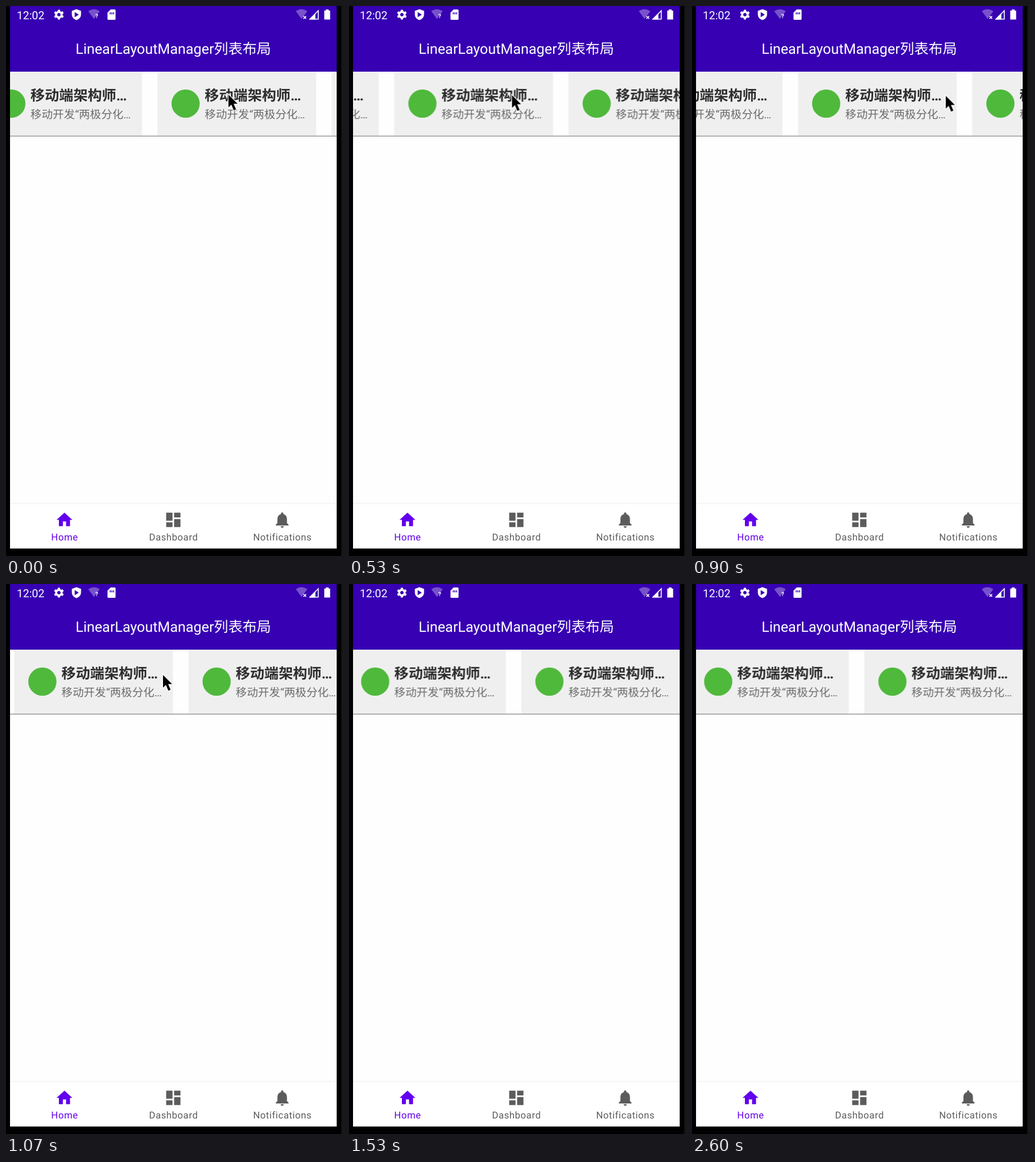
Recreate the animation shown at these times as an HTML page. Size 586 by 955 pixels, loop 2.63 s.

```html
<!DOCTYPE html>
<html lang="zh-CN">
<head>
<meta charset="utf-8">
<title>LinearLayoutManager</title>
<style>
  html, body { margin: 0; width: 100%; height: 100%; overflow: hidden; background: #000; }
  svg { display: block; }
  text { font-family: Roboto, "Noto Sans CJK SC", "Noto Sans CJK", sans-serif; text-rendering: geometricPrecision; }
  .heading { font-size: 24.85px; fill: #fff; text-anchor: middle; }
  .clock { font-size: 19.33px; fill: #fff; }
  .name { font-size: 24.85px; font-weight: 700; fill: #2d2d2d; }
  .note { font-size: 19.33px; fill: #6c6c6c; }
  .tab { font-size: 16.57px; letter-spacing: .55px; text-anchor: middle; }
  .nav { fill: #5c5c5c; }
  .nav .active { fill: #6200ee; }

  #list { animation: scroll 2630ms linear infinite; }
  #pointer { animation: point 2630ms linear infinite; }

  /* drag, fling, drag, fling, hard stop at the end of the list */
  @keyframes scroll {
    0% { transform: translateX(0); animation-timing-function: cubic-bezier(.36, .1, .67, .42); }
    12.5475% { transform: translateX(-225.5px); animation-timing-function: cubic-bezier(.33, .66, .67, .83); }
    27.7567% { transform: translateX(-608px); }
    33.27% { transform: translateX(-676.5px); animation-timing-function: cubic-bezier(.33, .1, .67, .36); }
    40.6844% { transform: translateX(-853.5px); animation-timing-function: cubic-bezier(.33, .57, .67, .75); }
    50.5703% { transform: translateX(-1123.5px); }
    53.42%, 100% { transform: translateX(-1176px); }
  }
  @keyframes point {
    0% { transform: translate(386px, 152px); animation-timing-function: cubic-bezier(.36, .1, .67, .42); }
    12.5475%, 14% { transform: translate(163px, 152px); animation-timing-function: ease-in-out; }
    27.7%, 33.27% { transform: translate(449px, 154px); animation-timing-function: cubic-bezier(.33, .1, .67, .36); }
    40.6844% { transform: translate(272px, 156px); opacity: 1; }
    57% { transform: translate(272px, 156px); opacity: 1; animation-timing-function: step-start; }
    57.01%, 100% { transform: translate(272px, 156px); opacity: 0; }
  }
</style>
</head>
<body>
<svg width="586" height="955" viewBox="0 0 586 955">
  <defs>
    <clipPath id="view"><rect x="7" y="114" width="568" height="112"/></clipPath>
    <g id="card">
      <rect y="114" width="276" height="111.5" fill="#efefef"/>
      <circle cx="49" cy="169.5" r="24.5" fill="#4fb93c"/>
      <text class="name" x="82.3" y="163.8">移动端架构师…</text>
      <text class="note" x="82.3" y="194.8">移动开发“两极分化…</text>
    </g>
    <path id="wifi" d="M-10 -13.5Q0 -20.5 10 -13.5L0 0z" opacity=".32"/>
    <path id="tooth" d="M-2.6 -5L-1.7 -8.6H1.7L2.6 -5z"/>
  </defs>

  <rect x="583" width="3" height="955" fill="#161616"/>
  <rect x="7" width="568" height="942" fill="#fefefe"/>
  <rect x="7" width="568" height="114" fill="#3700b3"/>
  <text class="heading" x="291" y="82.5">LinearLayoutManager列表布局</text>

  <!-- status bar -->
  <text class="clock" x="18.7" y="22.5">12:02</text>
  <g fill="#fff">
    <g id="gear" transform="translate(92 15)">
      <circle r="4.7" fill="none" stroke="#fff" stroke-width="3.4"/>
    </g>
    <path fill-rule="evenodd" d="M122.5 5.5l8 3v6c0 5-3.4 8.6-8 10-4.6-1.4-8-5-8-10v-6zM119.5 10.5v9l7-4.5z"/>
    <use href="#wifi" x="153" y="22.5"/>
    <text x="155.3" y="20.5" font-size="10" font-weight="700">?</text>
    <path fill-rule="evenodd" d="M182 6h7q1.5 0 1.5 1.5v15q0 1.5-1.5 1.5h-11q-1.5 0-1.5-1.5v-11zM180.5 11v3.5h1.6V11zM183.4 11v3.5h1.6V11zM186.3 11v3.5h1.6V11z"/>
    <use href="#wifi" x="514" y="22.5"/>
    <path d="M517.3 17.5l4.6 4.6m0-4.6l-4.6 4.6" stroke="#fff" stroke-width="1.6"/>
    <path d="M528.5 22.7L543 8.2v14.5z" fill="none" stroke="#fff" stroke-width="1.6"/>
    <path d="M527 23.5l11-11v11z"/>
    <path d="M556 6h5v2h2.6v15.5h-10.2V8h2.6z"/>
  </g>

  <g clip-path="url(#view)">
    <g id="list"></g>
  </g>
  <rect x="7" y="225" width="568" height="1.7" fill="#a3a3a3"/>

  <!-- bottom navigation -->
  <rect x="7" y="862.5" width="568" height="2.5" fill="#f6f6f6"/>
  <rect x="7" y="865" width="568" height="77" fill="#fff"/>
  <g class="nav">
    <g class="active">
      <path transform="translate(85.1 875.7) scale(1.38)" d="M10 20v-6h4v6h5v-8h3L12 3 2 12h3v8z"/>
      <text class="tab" x="102" y="928.4">Home</text>
    </g>
    <path transform="translate(274.4 875.7) scale(1.38)" d="M3 13h8V3H3zM3 21h8v-6H3zM13 21h8V11h-8zM13 3v6h8V3z"/>
    <text class="tab" x="291.3" y="928.4">Dashboard</text>
    <path transform="translate(463.7 875.7) scale(1.38)" d="M12 22c1.1 0 2-.9 2-2h-4c0 1.1.9 2 2 2zm6-6v-5c0-3.07-1.64-5.64-4.5-6.32V4c0-.83-.67-1.5-1.5-1.5s-1.5.67-1.5 1.5v.68C7.63 5.36 6 7.92 6 11v5l-2 2v1h16v-1l-2-2z"/>
    <text class="tab" x="480.6" y="928.4">Notifications</text>
  </g>

  <g id="pointer">
    <path d="M1 2v22l5-4.7 4.3 10 3.9-1.7-4.2-9.8h6.8z" stroke="#fff" stroke-width="2.4" paint-order="stroke"/>
  </g>
</svg>
<script>
  function addUse(parent, href, attrs) {
    const use = document.createElementNS('http://www.w3.org/2000/svg', 'use');
    use.setAttribute('href', href);
    for (const key in attrs) use.setAttribute(key, attrs[key]);
    parent.append(use);
  }

  const list = document.getElementById('list');
  const gear = document.getElementById('gear');
  const first = -39.5, pitch = 303;
  for (let i = 0; i < 6; i++) {
    addUse(list, '#card', { x: first + i * pitch });
    addUse(gear, '#tooth', { transform: `rotate(${i * 60})` });
  }
</script>
</body>
</html>
```
